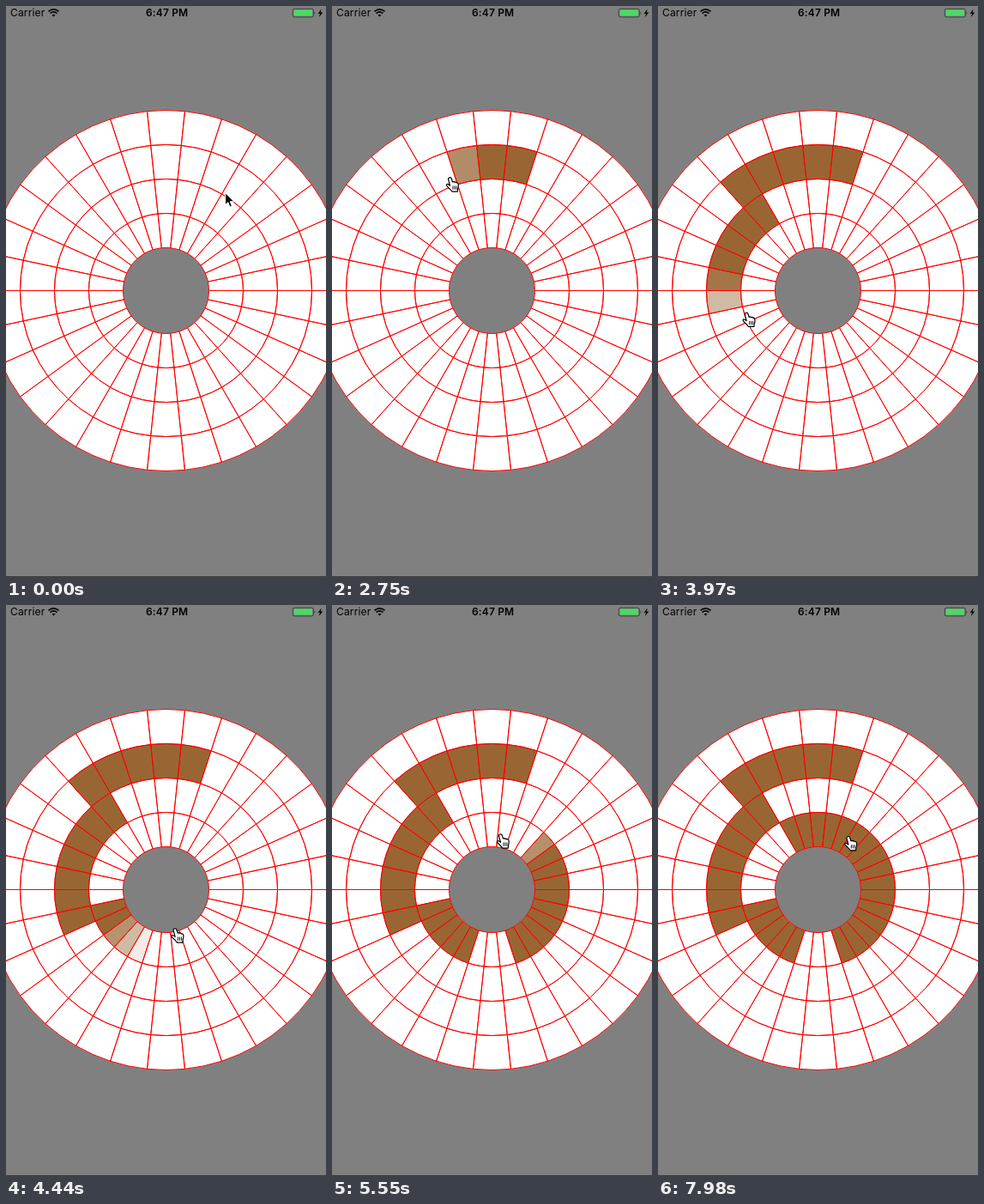
An HTML page for the animation above (8 s loop, 373 by 665 pixels).

```html
<!DOCTYPE html>
<html lang="en">
<head>
<meta charset="utf-8">
<title>Ring grid</title>
<style>
  html, body { margin: 0; width: 100%; height: 100%; overflow: hidden; background: #808080; }
  svg { display: block; width: 100vw; height: 100vh; }
  text { font: 12px Inter, Roboto, sans-serif; letter-spacing: .15px; }
</style>
</head>
<body>
<svg viewBox="0 0 373 665">
  <rect width="373" height="665" fill="#808080"/>
  <rect y="664" width="373" height="1" fill="#3c3c3c"/>

  <text x="5" y="12.4">Carrier</text>
  <g fill="none" stroke="#000" stroke-width="1.7">
    <path d="M49.5 6.4Q55.5 1.2 61.5 6.4M51.6 8.7Q55.5 5.2 59.4 8.7"/>
    <path d="M53.6 10.5Q55.5 8.9 57.4 10.5L55.5 12.6Z" fill="#000" stroke="none"/>
  </g>
  <text x="163" y="12.4" font-weight="600" style="font-weight:600">6:47 PM</text>
  <rect x="334.3" y="3.3" width="24" height="9.6" rx="2" fill="none" stroke="#222" stroke-width=".7"/>
  <rect x="335.6" y="4.6" width="21.4" height="7" rx="1" fill="#4cd964"/>
  <path d="M359.6 6.6Q361.2 8.2 359.6 9.9Z" fill="#222"/>
  <path d="M367.6 3.4L363.6 8.9H366L364.9 13L369.2 7.4H366.7Z"/>

  <circle cx="186.5" cy="331.5" r="210" fill="#fff"/>
  <circle cx="186.5" cy="331.5" r="50" fill="#808080"/>
  <g id="fills" fill="#963"/>
  <g id="lines" fill="none" stroke="#f00"/>

  <g id="arrow" transform="translate(255 217)">
    <path d="M.7.7V14.6L3.8 11.7L6 17L8.4 16L6.2 10.8H10.8Z" stroke="#fff"/>
  </g>
  <g id="hand" stroke="#000" stroke-linecap="round" stroke-linejoin="round">
    <path fill="#fff" stroke-width="1.2" d="M4.4.8C5.6.4 6.4 1.2 6.8 2.4L8 6C8.6 5.2 9.9 5.3 10.2 6.4C10.8 5.6 12 5.8 12.3 6.9C13.2 6.4 14.3 7 14.5 8.2C15 10.5 14.8 12 14 13.5L13.6 17H7.2C6 15 4 13.5 2.2 11.6C.8 10.4.4 9.2 1.2 8.6C2.2 8 3.6 9 4.9 10.2L3 3C2.7 2 3.2 1.1 4.4.8Z"/>
    <path fill="none" stroke-width=".9" d="M8.3 10.8V14.3M10.3 10.8V14.3M12.3 10.8V14.3"/>
  </g>
</svg>
<script>
const LOOP = 8000, HAND_AT = 650, PRESS = 2090, RELEASE = 6160, LAG = 110, FADE = 250;
const CX = 186.5, CY = 331.5, HOLE = 50, BAND = 40, RINGS = 4, STEP = 12, SECTORS = 30;
const $ = id => document.getElementById(id);

// Fingertip in polar form around the wheel: time, degrees, radius
const keys = [
  [980, 58, 132], [1460, 74, 143.5], [1910, 74, 143.5], [2200, 75, 144],
  [2900, 120, 139], [2980, 128, 130], [3110, 144, 116], [3430, 151, 102],
  [3650, 160, 104], [3830, 185, 103], [4000, 200, 84], [4215, 213, 69],
  [4335, 251, 50], [4440, 283, 47], [4640, 312, 53], [5050, 364, 61],
  [5430, 407, 65], [5550, 441, 65], [6000, 468.5, 50.5], [6160, 479.5, 40],
  [7830, 479.5, 40], [7980, 420, 71]
];

function tipAt(t) {
  const i = keys.findIndex(k => k[0] > t);
  if (i <= 0) return keys.at(i).slice(1);
  const [t0, a0, r0] = keys[i - 1], [t1, a1, r1] = keys[i];
  const k = (t - t0) / (t1 - t0);
  return [a0 + (a1 - a0) * k, r0 + (r1 - r0) * k];
}

function polar(deg, r) {
  const a = deg * Math.PI / 180;
  return [CX + r * Math.cos(a), CY - r * Math.sin(a)];
}

function cellPath(ring, sector) {
  const r = HOLE + ring * BAND, R = r + BAND, a = sector * STEP, b = a + STEP;
  return `M${polar(a, r)}L${polar(a, R)}A${R} ${R} 0 0 0 ${polar(b, R)}L${polar(b, r)}A${r} ${r} 0 0 1 ${polar(a, r)}Z`;
}

function addCell(parent, ring, sector) {
  const el = document.createElementNS('http://www.w3.org/2000/svg', 'path');
  el.setAttribute('d', cellPath(ring, sector));
  return $(parent).appendChild(el);
}

// Every cell has its own outline, so shared edges are drawn twice
for (let ring = 0; ring < RINGS; ring++)
  for (let sector = 0; sector < SECTORS; sector++) addCell('lines', ring, sector);

// A cell lights up shortly after the pressed fingertip first enters it
const lit = new Map();
for (let t = PRESS; t < RELEASE; t += 2) {
  const [deg, r] = tipAt(t);
  const ring = Math.floor((r - HOLE) / BAND), sector = Math.floor(deg / STEP) % SECTORS;
  const id = ring * SECTORS + sector;
  if (ring >= 0 && !lit.has(id)) lit.set(id, { start: t + LAG, el: addCell('fills', ring, sector) });
}

// cubic-bezier(.25, .1, .25, 1)
function ease(x) {
  if (x <= 0) return 0;
  if (x >= 1) return 1;
  const curve = (p, q, s) => 3 * p * s * (1 - s) ** 2 + 3 * q * s * s * (1 - s) + s ** 3;
  let lo = 0, hi = 1;
  for (let i = 0; i < 16; i++) {
    const mid = (lo + hi) / 2;
    if (curve(.25, .25, mid) < x) lo = mid; else hi = mid;
  }
  return curve(.1, 1, lo);
}

function draw(t) {
  for (const { el, start } of lit.values()) el.setAttribute('fill-opacity', ease((t - start) / FADE));
  const [x, y] = polar(...tipAt(t));
  $('hand').setAttribute('transform', `translate(${x - 5} ${y - 1.2})`);
  $('arrow').setAttribute('display', t < HAND_AT ? 'inline' : 'none');
  $('hand').setAttribute('display', t < HAND_AT ? 'none' : 'inline');
}

function frame() {
  draw(performance.now() % LOOP);
  requestAnimationFrame(frame);
}
frame();
</script>
</body>
</html>
```
